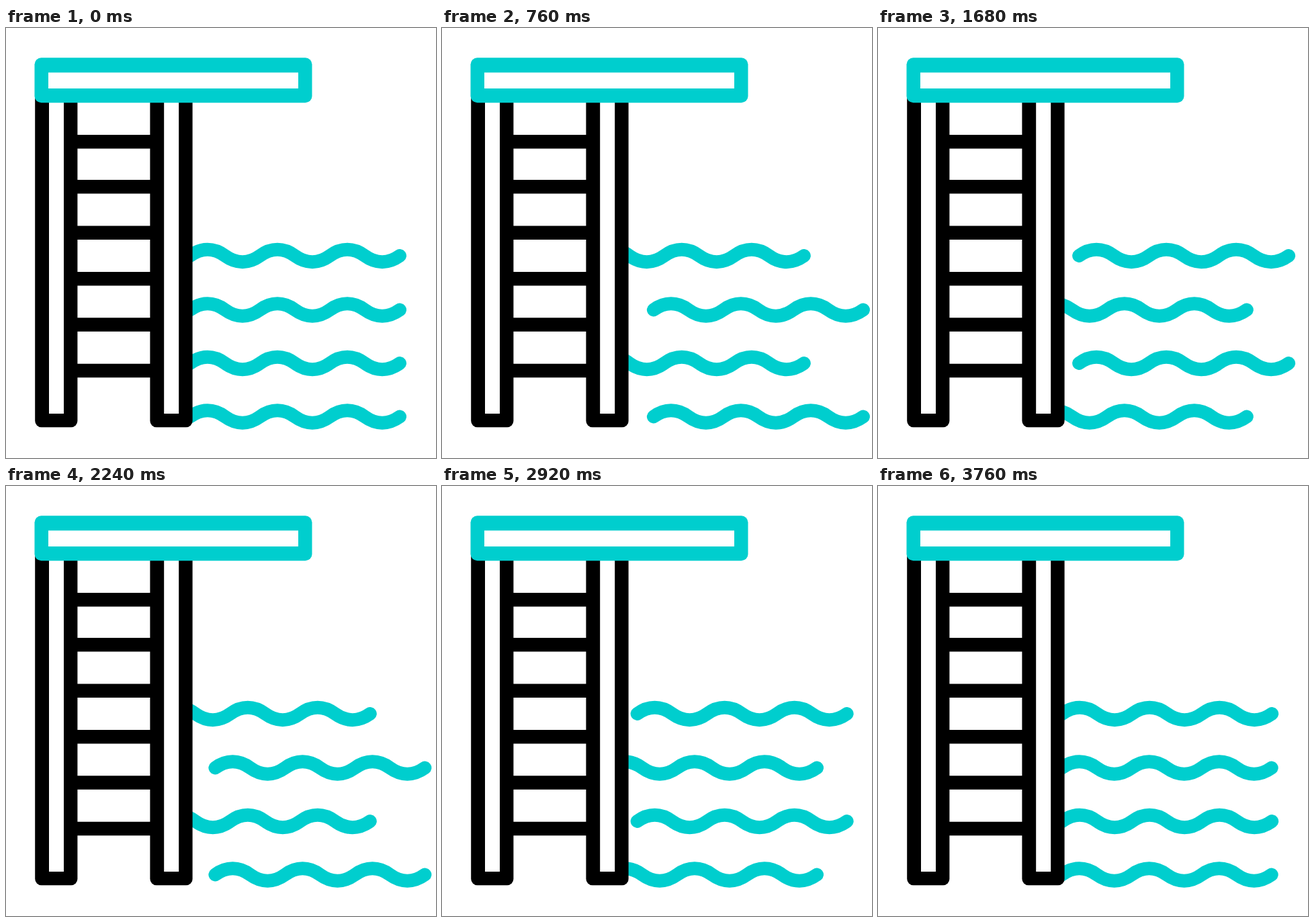
An HTML page that plays this animation: 640 by 640 pixels, repeating every 3800 ms.

```html
<!DOCTYPE html>
<html lang="en">
<head>
<meta charset="utf-8">
<title>Diving board</title>
<style>
  html, body { margin: 0; width: 100%; height: 100%; overflow: hidden; background: #fff; }
  svg { display: block; width: 100%; height: 100%; }
</style>
</head>
<body>
<svg viewBox="0 0 640 640">
  <defs>
    <clipPath id="pool"><rect x="277" y="300" width="363" height="320"/></clipPath>
    <path id="wave" d="M274 0c17-12.3 35-12.3 52 0s35 12.3 52 0s35-12.3 52 0s35 12.3 52 0s35-12.3 52 0s35 12.3 52 0"/>
    <g id="leg">
      <rect x="43.2" y="80" width="63.2" height="514.2" rx="9.5"/>
      <rect x="64" y="80" width="22" height="494" fill="#fff"/>
    </g>
  </defs>
  <g clip-path="url(#pool)">
    <g id="waves" fill="none" stroke="#00cece" stroke-width="20" stroke-linecap="round">
      <use href="#wave" y="339"/>
      <use href="#wave" y="419.5"/>
      <use href="#wave" y="499"/>
      <use href="#wave" y="578.5"/>
    </g>
  </g>
  <use href="#leg"/>
  <use href="#leg" x="171.2"/>
  <path d="M105 169.2h111M105 236.3h111M105 304.8h111M105 373.2h111M105 441.5h111M105 510h111" stroke="#000" stroke-width="20.5"/>
  <rect x="42.5" y="44.3" width="413" height="67" rx="10" fill="#00cece"/>
  <rect x="63" y="66.3" width="372" height="23.7" fill="#fff"/>
</svg>
<script>
  const LOOP = 3800, STEP = 40;
  // Turning points: time, shift of 1st and 3rd wave, shift of 2nd and 4th wave
  const KEYS = [
    [0, 0, 0],
    [825, -48.5, 42],
    [1565, 31, -43.5],
    [2335, -48.5, 42],
    [3125, 31, -43.5],
    [3780, 0, 0],
    [LOOP, 0, 0]
  ];
  const waves = [...document.getElementById('waves').children];
  const ease = p => 0.85 * p * p * (3 - 2 * p) + 0.15 * p;

  function draw(now) {
    const t = Math.floor(now % LOOP / STEP) * STEP;
    const next = KEYS.findIndex(key => key[0] > t);
    const from = KEYS[next - 1], to = KEYS[next];
    const p = ease((t - from[0]) / (to[0] - from[0]));
    waves.forEach((wave, i) => {
      const side = 1 + i % 2;
      wave.setAttribute('x', from[side] + (to[side] - from[side]) * p);
    });
  }

  const start = performance.now();
  function tick() {
    draw(performance.now() - start);
    requestAnimationFrame(tick);
  }
  tick();
</script>
</body>
</html>
```
